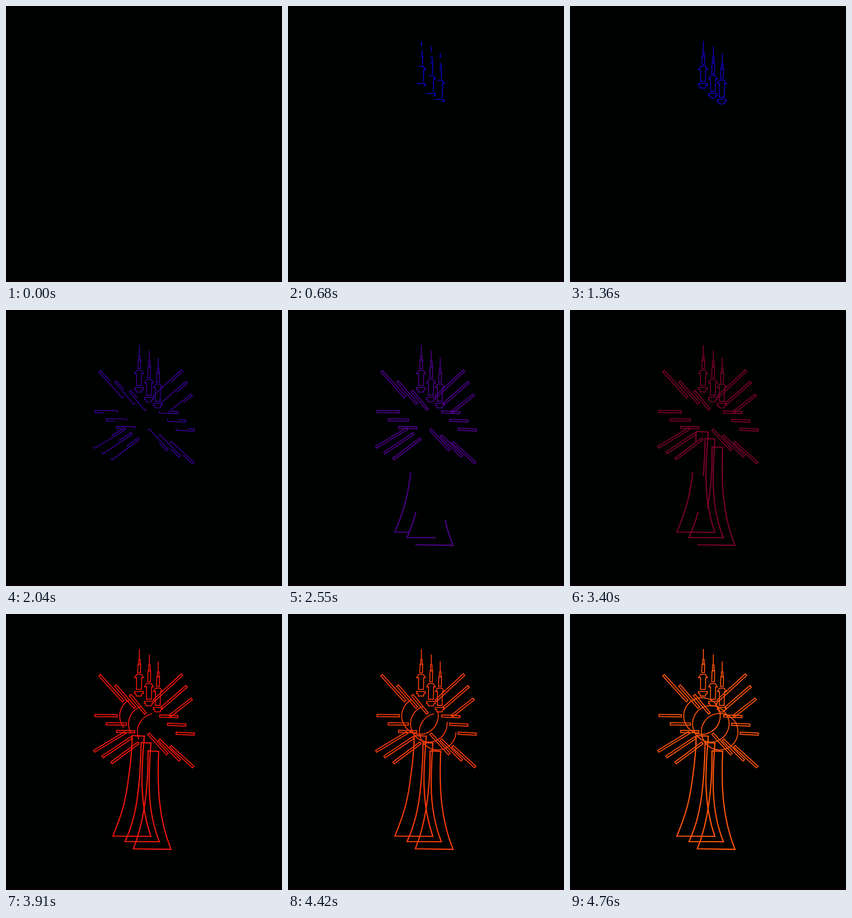
Animation, 480 px wide and 480 px high, one loop 6630 ms. Source, as an HTML page:

```html
<!DOCTYPE html>
<html lang="en">
<head>
<meta charset="utf-8">
<title>Line drawing</title>
<style>
html, body { margin: 0; width: 100%; height: 100%; overflow: hidden; background: #000201; }
svg { display: block; width: 100%; height: 100%; }
</style>
</head>
<body>
<svg viewBox="0 0 480 480">
  <rect y="476" width="480" height="4" fill="#080006"/>
  <g id="art" fill="none"></g>
</svg>
<script>
const STEP = 170, LOOP = 6630;
const art = document.getElementById('art');
const strokes = [];

const mix = (a, b, k) => a.map((v, i) => v + (b[i] - v) * k);

// Interpolates rows of [time, ...values].
function valueAt(keys, t) {
  const i = Math.max(1, keys.findIndex(k => k[0] >= t));
  const a = keys[i - 1], b = keys[i];
  return mix(a, b, (t - a[0]) / (b[0] - a[0])).slice(1);
}

// A stroke is revealed along its length; keys hold [time, drawn share].
function add(d, width, ...keys) {
  const el = document.createElementNS('http://www.w3.org/2000/svg', 'path');
  el.setAttribute('d', d);
  el.setAttribute('pathLength', 1);
  el.setAttribute('stroke-width', width);
  art.append(el);
  strokes.push({ el, keys: [[0, 0], ...keys, [LOOP, 1]] });
}

// Spire, two shafts, roofed column and foot.
function tower(x, top, neck, roof, foot) {
  const tip = top + 17.5, c = x - .8, wall = foot - roof - 9.2;
  [
    `M${x} ${top}V${tip}`,
    `M${x - 1.2} ${tip + .5}h2.4l.3 ${neck - tip - 1.2}h-3z`,
    `M${x - 2.3} ${neck}h4.6l-.4 ${roof - neck - 3}h-4.8z`,
    `M${c - 4} ${roof}h8.2l3.8 5.6h-3.2l-.5 ${wall}h-8.6l.3 ${-wall}h-3.6z`,
    `M${c - 7.6} ${foot}h15.2v3.6h-2.2l-1 4.2h-9l-1-4.2h-2z`
  ].forEach(d => add(d, 1.6, [1360, 1]));
}
tower(232, 61, 87.5, 105, 134.8);
tower(249.3, 70.5, 99, 121, 152);
tower(264.7, 82.5, 109.5, 129, 162.5);

// Three thin bars spread between a first and a last [x1, y1, x2, y2].
function fan(first, last, side) {
  for (const k of [0, .48, 1]) {
    const [x1, y1, x2, y2] = mix(first, last, k);
    const s = side * 1.9 / Math.hypot(x2 - x1, y2 - y1);
    const nx = (y1 - y2) * s, ny = (x2 - x1) * s;
    add(`M${x1 + nx} ${y1 + ny}L${x1 - nx} ${y1 - ny} ${x2 - nx} ${y2 - ny} ${x2 + nx} ${y2 + ny}z`,
      1.7, [1360, 0], [2300, 1]);
  }
}
fan([242.5, 173.2, 216, 141], [203.7, 151.5, 162.8, 106.5], 1);
fan([224, 204.7, 192.3, 204.3], [193.7, 177, 154.8, 176.4], -1);
fan([153.2, 238.8, 207, 206.4], [183.5, 259, 230.4, 224], -1);
fan([257.2, 150.6, 306.1, 105.4], [284.7, 177.7, 323, 147.7], 1);
fan([267.3, 177.4, 299, 178.5], [296, 207.2, 327.6, 209], -1);
fan([248, 208.2, 280.6, 243.8], [286, 230, 325.7, 266.2], 1);

// Flared pillars, with the shares drawn at two moments.
function pillar(d, early, late) {
  add(d, 2.1, [2210, 0], [2890, early], [3400, late], [3610, 1]);
}
pillar('M213.5 282C209 320 203 345 185.8 386.3L252 386.8C232 330 235 275 240.6 212.5L219.5 211.3Q219 245 213.5 282z', .607, .88);
pillar('M222.5 351Q217 374 207 395.7L266.8 396C244 340 248 280 252 224.5L235 223.5C234 270 231 318 222.5 351z', .457, .852);
pillar('M221.5 408.2L287 409.3C265 355 263 300 265.5 239L247 238C247.5 300 241 360 221.5 408.2z', .517, .847);

// Circles run anticlockwise from the upper left.
for (let i = 0; i < 3; i++) {
  const r = 31.8, a = (243 + 8 * i) * Math.PI / 180;
  const dx = r * Math.cos(a), dy = r * Math.sin(a), arc = `a${r} ${r} 0 0 0 `;
  add(`M${229.5 + 15.4 * i + dx} ${177.3 + 13.7 * i + dy}${arc}${-2 * dx} ${-2 * dy}${arc}${2 * dx} ${2 * dy}`,
    1.7, [3570, 0], [4760, 1]);
}

const colours = [
  [0, 0, 0, 225], [1360, 20, 0, 185], [2040, 52, 0, 136], [2890, 92, 0, 134],
  [3400, 120, 0, 46], [3910, 240, 22, 12], [4760, 255, 85, 10], [LOOP, 255, 85, 10]
];

const start = performance.now();
function draw() {
  const t = Math.floor((performance.now() - start) % LOOP / STEP) * STEP;
  art.setAttribute('stroke', `rgb(${valueAt(colours, t).map(Math.round)})`);
  for (const { el, keys } of strokes) {
    const [p] = valueAt(keys, t);
    el.style.display = p > 0 ? '' : 'none';
    el.setAttribute('stroke-dasharray', p < 1 ? `${p} 2` : 'none');
  }
  requestAnimationFrame(draw);
}
draw();
</script>
</body>
</html>
```
